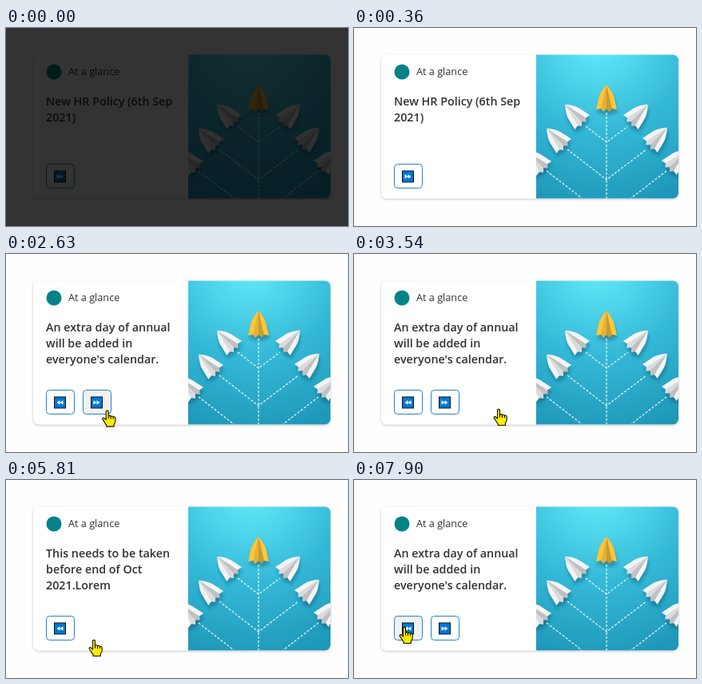
Recreate the animation shown at these times as an HTML page. Size 428 px wide and 248 px high, loop 8000 ms.

```html
<!DOCTYPE html>
<html lang="en">
<head>
<meta charset="utf-8">
<style>
  html, body { margin: 0; width: 100%; height: 100%; overflow: hidden; background: #fefefe; }
  svg { display: block; font-family: "Open Sans", "Noto Sans", sans-serif; fill: #323130; }
  #title { font-size: 14.3px; font-weight: 600; }
  .button { fill: #fff; stroke: #2a80c4; }
  .hover .button { fill: #f1f1f4; }
</style>
</head>
<body>
<svg width="428" height="248" viewBox="0 0 428 248">
  <defs>
    <radialGradient id="sky" gradientUnits="userSpaceOnUse" cx="305" cy="15" r="225">
      <stop offset="0" stop-color="#66ecfa"/>
      <stop offset=".2" stop-color="#52d8ee"/>
      <stop offset=".5" stop-color="#35b9d8"/>
      <stop offset="1" stop-color="#1b93b4"/>
    </radialGradient>
    <filter id="shadow" x="-10%" y="-10%" width="120%" height="125%">
      <feDropShadow dx="0" dy="1" stdDeviation="1.5" flood-opacity=".25"/>
    </filter>
    <filter id="blur" x="-50%" y="-50%" width="200%" height="200%"><feGaussianBlur stdDeviation="2"/></filter>
    <clipPath id="cardClip"><rect x="34" y="33.5" width="372" height="180" rx="7"/></clipPath>
    <clipPath id="photoClip"><rect x="228" y="33" width="178" height="181"/></clipPath>
    <g id="plane">
      <path d="M0-17C-6-10-9-5-10 1L-13 14-7 13-4 17 0 13 4 17 7 13 13 14 10 1C9-5 6-10 0-17Z"/>
      <path d="M0-17-7 13-4 17 0 13 4 17 7 13Z" fill="#000" opacity=".1"/>
      <path d="M0-17 0 13 4 17 7 13Z" fill="#000" opacity=".12"/>
    </g>
    <g id="icon">
      <rect x="10.5" y="9" width="14" height="14" fill="#0078d7" stroke="#111"/>
      <path d="M13.5 13.2 17.5 16 13.5 18.8ZM17.5 13.2 21.5 16 17.5 18.8Z" fill="#fff"/>
    </g>
  </defs>

  <rect x="34" y="33.5" width="372" height="180" rx="7" fill="#fff" filter="url(#shadow)"/>
  <g clip-path="url(#cardClip)"><g clip-path="url(#photoClip)">
    <rect x="228" y="33" width="178" height="181" fill="url(#sky)"/>
    <g id="shades" transform="translate(1 5)" fill="#0b5875" opacity=".45" filter="url(#blur)"></g>
    <path d="M316 106V214M290 123 316 143 343 123M267 152 316 190 366 152M241 179 285 213M391 179 347 213"
      fill="none" stroke="#e6f6fb" stroke-width="1.3" stroke-dasharray="3 2"/>
    <g id="planes" fill="#f3f4f5"></g>
  </g></g>

  <circle cx="60" cy="55" r="9.5" fill="#038387"/>
  <text x="78" y="59" font-size="12.7">At a glance</text>
  <g id="title"><text x="50" y="97"></text><text x="50" y="117"></text><text x="50" y="137"></text></g>
  <g id="prev">
    <rect class="button" x=".5" y=".5" width="35" height="30" rx="4"/>
    <use href="#icon" transform="translate(35) scale(-1 1)"/>
  </g>
  <g id="next">
    <rect class="button" x=".5" y=".5" width="35" height="30" rx="4"/>
    <use href="#icon"/>
  </g>
  <path id="cursor" fill="#ffee00" stroke="#111" stroke-width="1.2" stroke-linejoin="round"
    d="M-1.6 1.5Q0-.8 1.6 1.5V8Q3.3 6.2 4.8 8.3 6.6 7 8 9 10.2 8.2 11 10.5V15Q10.6 17.5 9 19V22H-1V20Q-3 18-4 15.5L-6.3 12.3Q-6.6 9.8-4.3 10.5L-1.6 13ZM1.6 8V11.5M4.8 8.3V12M8 9V12"/>
  <rect id="dim" width="428" height="248" fill="#000"/>
</svg>
<script>
const LOOP = 8000, STEP = 91;
const $ = id => document.getElementById(id);

const pages = [
  { lines: ["New HR Policy (6th Sep", "2021)"], next: 50 },
  { lines: ["An extra day of annual", "will be added in", "everyone's calendar."], prev: 50, next: 96 },
  { lines: ["This needs to be taken", "before end of Oct", "2021.Lorem"], prev: 50 }
];
// Start time and page index
const turns = [[0, 0], [1810, 1], [5180, 2], [7360, 1]];
// Time, x and y of the fingertip
const path = [
  [1000, 108, 240], [1600, 74, 191], [2050, 74, 191], [2900, 142, 197], [3540, 181, 194],
  [4000, 174, 194], [4850, 113, 187], [5630, 113, 187], [5810, 110, 200],
  [6350, 98, 222], [7100, 63, 184], [8000, 63, 184]
];

// x, y, angle
const flock = [[276, 108, -44], [356, 108, 44], [253, 138, -44], [380, 137, 44], [228, 166, -44], [404, 165, 44]];
const plane = ([x, y, angle], fill = "") =>
  `<use href="#plane" transform="translate(${x} ${y}) rotate(${angle})" ${fill}/>`;
const whites = flock.map(p => plane(p)).join("");
$("shades").innerHTML = whites + plane([316, 88, 0]);
$("planes").innerHTML = whites + plane([316, 88, 0], 'fill="#ffc63c"');

function cursorAt(t) {
  const i = path.findIndex(p => p[0] > t);
  if (i < 1) return null;
  const [t0, x0, y0] = path[i - 1], [t1, x1, y1] = path[i];
  const k = (t - t0) / (t1 - t0), ease = k * k * (3 - 2 * k);
  return [x0 + (x1 - x0) * ease, y0 + (y1 - y0) * ease];
}

function placeButton(name, x, tip) {
  const button = $(name);
  button.style.display = x ? "" : "none";
  if (!x) return;
  button.setAttribute("transform", `translate(${x} 170)`);
  const over = tip && tip[0] >= x && tip[0] <= x + 36 && tip[1] >= 170 && tip[1] <= 201;
  button.classList.toggle("hover", !!over);
}

function draw(now) {
  const time = now % LOOP;
  const t = Math.floor((time + 16) / STEP) * STEP;
  const page = pages[turns.filter(turn => turn[0] <= time).pop()[1]];
  const tip = cursorAt(t);
  [...$("title").children].forEach((line, i) => line.textContent = page.lines[i] || "");
  placeButton("prev", page.prev, tip);
  placeButton("next", page.next, tip);
  $("cursor").style.display = tip ? "" : "none";
  if (tip) $("cursor").setAttribute("transform", `translate(${tip}) scale(.93)`);
  $("dim").setAttribute("opacity", Math.max(0, 0.8 - t / 455));
  requestAnimationFrame(draw);
}
draw(0);
</script>
</body>
</html>
```
